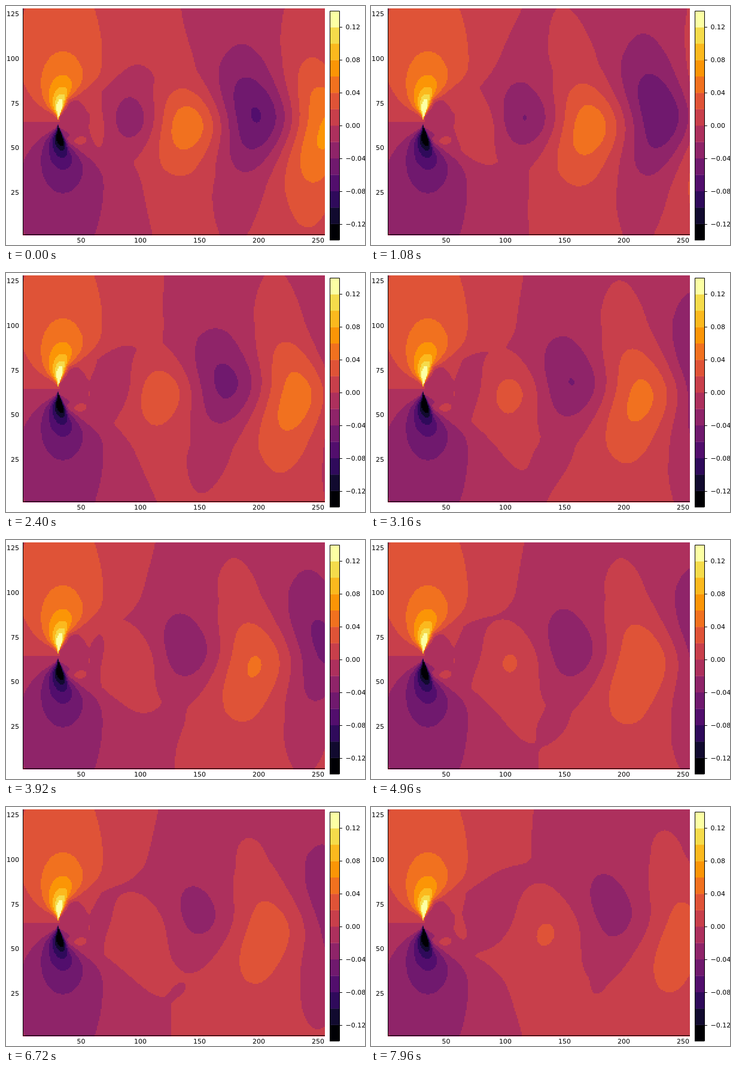
These frames come from a looping animation (600 px wide and 400 px high, 8000 ms). An HTML page with a canvas:

```html
<!DOCTYPE html>
<html lang="en">
<head>
<meta charset="utf-8">
<title>Wake contours</title>
<style>
  html, body { margin: 0; width: 100%; height: 100%; overflow: hidden; background: #fff; }
  canvas { position: absolute; left: 28px; top: 4px; width: 506px; height: 380px; image-rendering: pixelated; }
  svg { position: absolute; left: 0; top: 0; }
  text { font: 11px "DejaVu Sans", sans-serif; fill: #000; }
</style>
</head>
<body>
<canvas id="field" width="253" height="190"></canvas>
<svg id="axes" width="600" height="400" viewBox="0 0 600 400"></svg>
<script>
const COLORS = ['#000004', '#110a2f', '#2f0a5b', '#520e6d', '#70196e', '#8f2469', '#ad305d',
  '#c83f4b', '#df5337', '#f1711f', '#fb9506', '#fbb91e', '#f5db4b', '#fcffa4'];
const LOOP = 8000, STEP = 40, CELL = 2, LEFT = 28, TOP = 4;
const MID_Y = 194.5, WAVELENGTH = 222.5, PERIOD = 0.89;

const canvas = document.getElementById('field');
const ctx = canvas.getContext('2d');
const W = canvas.width, H = canvas.height;
const image = ctx.createImageData(W, H);
const pixels = new Uint32Array(image.data.buffer);
const palette = COLORS.map(c => {
  const n = parseInt(c.slice(1), 16);
  return (255 << 24 | (n & 255) << 16 | (n & 0xff00) | n >> 16) >>> 0;
});

const bell = (x, w) => Math.exp(-((x / w) ** 2));

// Steady flow around the plate: two mirrored lobes, a bubble and a weak far field.
function steady(x, y) {
  const u = MID_Y - y, a = Math.abs(u) + 1e-6, side = Math.sign(u);
  const dx = x - (85 + 10 * Math.tanh(a / 30));
  const squeeze = 2.3 + 1500 / (a * a);
  let lobe = 4.75 * a / (squeeze * dx * dx + a * a) * (1 - bell(a, 16));
  if (x > 88) {
    const depth = Math.max(0, a - 4.9 * Math.sqrt(x - 88));
    const width = 25 * Math.min(1, (x - 85) / 20);
    lobe *= Math.max(0.15, 1 - bell(depth, width));
  }
  const far = 0.009 * Math.tanh(a / 45) * (1 - bell(Math.max(0, x - 125), 60));
  let value = side * (lobe - far);
  if (x > 90) {
    const edge = Math.hypot((x - 108) / 25, (y - 187) / 33);
    value -= 0.014 / (1 + Math.exp((edge - 1) * 22));
    value += 0.012 * bell(x - 121, 11) * bell(y - 226, 7);
  }
  return value;
}

const base = new Float32Array(W * H);
const waveCos = new Float32Array(W * H);
const waveSin = new Float32Array(W * H);
const growth = new Float32Array(W);

for (let j = 0; j < H; j++) {
  for (let i = 0; i < W; i++) {
    const x = LEFT + (i + 0.5) * CELL, y = TOP + (j + 0.5) * CELL, k = j * W + i;
    const u2 = (y - MID_Y) ** 2;
    const spread = Math.max(35, 57 + 0.25 * (x - 208));
    const envelope = Math.pow(1 + u2 / (spread * spread), -1.5);
    const lag = 50 * u2 / (u2 + 8100);
    const crest = 0.93 * (x + lag) + 24.5 - 54 * Math.exp(-Math.max(0, x - 150) / 50);
    const phase = 2 * Math.PI * (crest - 413) / WAVELENGTH;
    base[k] = steady(x, y);
    waveCos[k] = envelope * Math.cos(phase);
    waveSin[k] = envelope * Math.sin(phase);
  }
}

function draw(ms) {
  const t = ms / 1000;
  const drift = 20 * Math.sin(Math.PI * Math.pow(t / 8, 0.7));
  const turn = 2 * Math.PI * (t / PERIOD + drift / WAVELENGTH);
  const c = Math.cos(turn), s = Math.sin(turn);
  const peak = 0.063 * Math.exp(-0.09 * t), reach = 90 + 7 * t;
  for (let i = 0; i < W; i++) {
    const x = LEFT + (i + 0.5) * CELL;
    growth[i] = peak * (1 - Math.exp(-Math.max(0, x - 140) / reach));
  }
  for (let k = 0; k < pixels.length; k++) {
    const value = base[k] - growth[k % W] * (waveCos[k] * c + waveSin[k] * s);
    const level = Math.floor((value + 0.14) / 0.02);
    pixels[k] = palette[Math.max(0, Math.min(13, level))];
  }
  ctx.putImageData(image, 0, 0);
}

function drawAxes() {
  const label = (x, y, text, anchor) => `<text x="${x}" y="${y}" text-anchor="${anchor}">${text}</text>`;
  const band = 384 / 14;
  let out = '<path d="M533 0H541V400H533ZM0 384H541V400H0Z" fill="#fff"/>';
  COLORS.forEach((color, i) => {
    out += `<rect x="541" y="${392 - (i + 1) * band}" width="16" height="${band + 0.3}" fill="${color}"/>`;
  });
  out += '<path d="M28.5 4V383M28 382.5H533M541.5 8.5H557.5V391.5H541.5Z" fill="none" stroke="#000"/>';
  for (let v = 50; v <= 250; v += 50) out += label(26.5 + 1.98 * v, 396, v, 'middle');
  for (let v = 25; v <= 125; v += 25) out += label(22, 390.7 - 2.987 * v, v, 'end');
  for (let n = -3; n <= 3; n++) {
    const y = 200 - n * 2 * band;
    const text = (n < 0 ? '\u2212' : '') + Math.abs(n * 0.04).toFixed(2);
    out += `<path d="M557 ${Math.round(y) + 0.5}h5" stroke="#000"/>` + label(567.5, y + 4, text, 'start');
  }
  document.getElementById('axes').innerHTML = out;
}

let shown = -1;
const start = performance.now();
function tick() {
  const elapsed = Math.max(0, performance.now() - start) % LOOP;
  const now = Math.floor(elapsed / STEP) * STEP;
  if (now !== shown) draw(shown = now);
  requestAnimationFrame(tick);
}

drawAxes();
tick();
</script>
</body>
</html>
```
